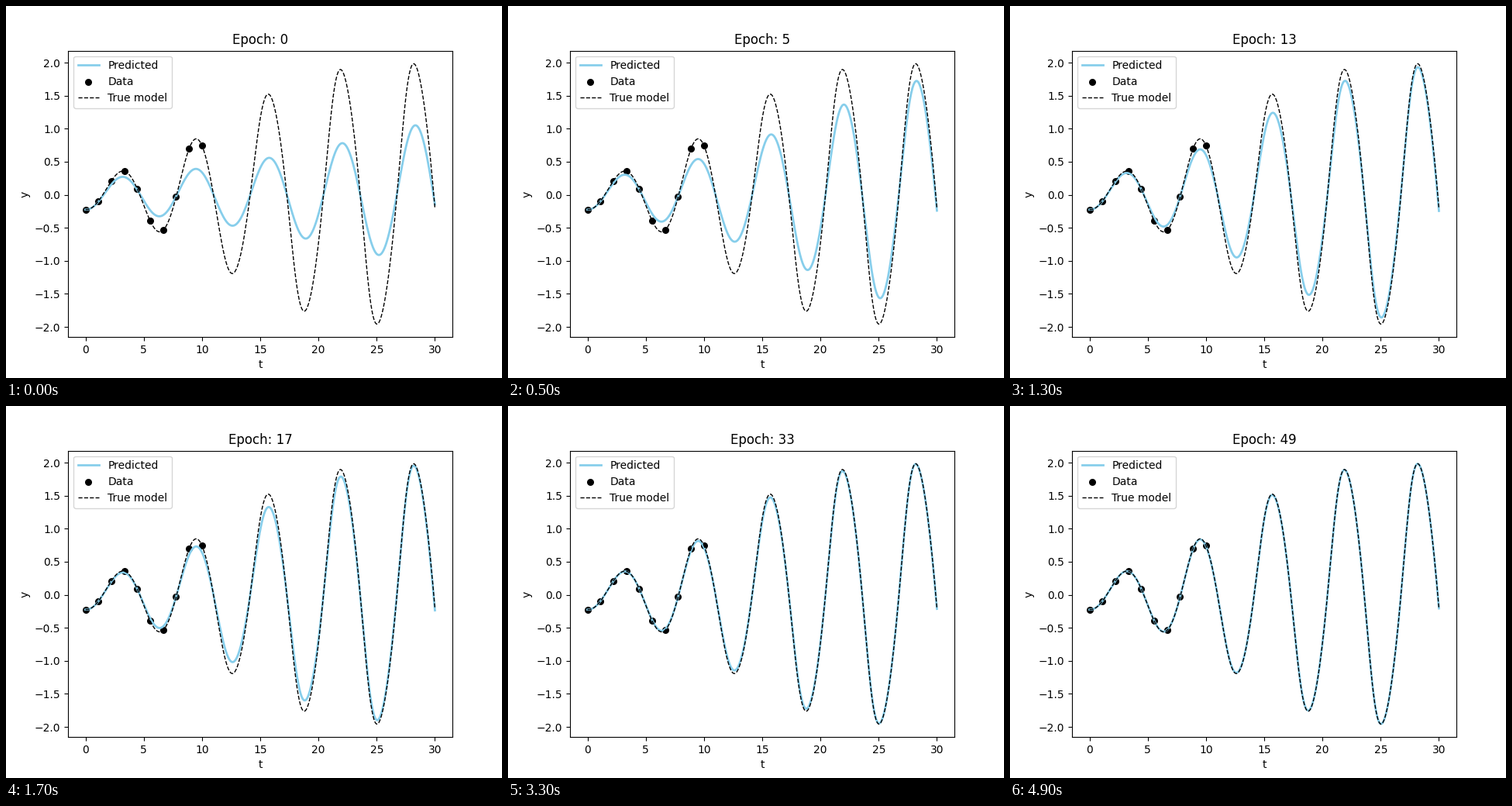
These frames come from a looping animation (640 px wide and 480 px high, 5 s). A matplotlib script:

```python
import numpy as np
import matplotlib.pyplot as plt
from matplotlib.animation import FuncAnimation

EPOCHS = 50
TRUE_MU = 0.3
START = (-0.225, -0.01)
SUBSTEPS = 4


def van_der_pol(state, mu):
    y, v = state
    return np.array([v, mu * (1 - y**2) * v - y])


def solve(mu, times):
    """Integrate with RK4; mu may hold several values, one per column."""
    mu = np.atleast_1d(mu)
    state = np.outer(START, np.ones(mu.size))
    path = [state[0]]
    for span in np.diff(times):
        h = span / SUBSTEPS
        for _ in range(SUBSTEPS):
            k1 = van_der_pol(state, mu)
            k2 = van_der_pol(state + h / 2 * k1, mu)
            k3 = van_der_pol(state + h / 2 * k2, mu)
            k4 = van_der_pol(state + h * k3, mu)
            state = state + h / 6 * (k1 + 2 * k2 + 2 * k3 + k4)
        path.append(state[0])
    return np.array(path)


def learned_mu(epoch):
    """The parameter closes in on its true value, fastest at first."""
    decay = 0.08 * epoch + 0.265 * (1 - np.exp(-epoch / 9))
    return TRUE_MU - 0.18 * np.exp(-decay)


t = np.linspace(0, 30, 300)
t_data = np.linspace(0, 10, 10)
truth = solve(TRUE_MU, t)[:, 0]
data = solve(TRUE_MU, t_data)[:, 0]
predictions = solve(learned_mu(np.arange(EPOCHS)), t)

fig, ax = plt.subplots(figsize=(6.4, 4.8), dpi=100)
predicted, = ax.plot(t, predictions[:, 0], color="skyblue", lw=2,
                     label="Predicted")
ax.scatter(t_data, data, s=30, color="black", label="Data")
ax.plot(t, truth, "k--", lw=1, label="True model")
ax.set_xlabel("t")
ax.set_ylabel("y")
title = ax.set_title("Epoch: 0")
ax.legend(loc="upper left")


def update(epoch):
    predicted.set_ydata(predictions[:, epoch])
    title.set_text(f"Epoch: {epoch}")
    return predicted, title


anim = FuncAnimation(fig, update, frames=EPOCHS, interval=100, repeat=True)
plt.show()
```
